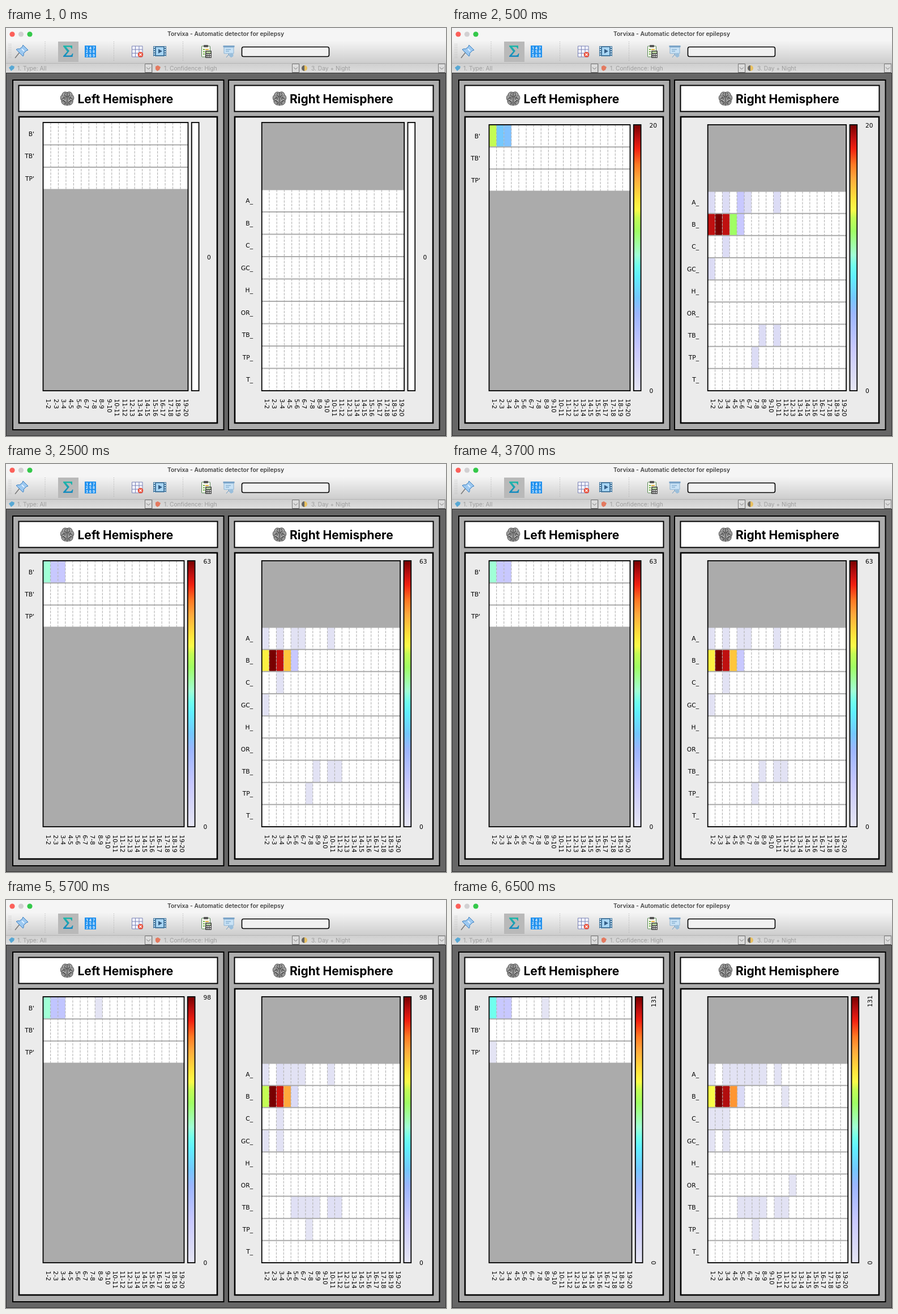
Write an HTML page that moves like this. It is 777x721 px and loops after 8000 ms.

```html
<!DOCTYPE html>
<html lang="en">
<head>
<meta charset="utf-8">
<title>Detector</title>
<style>
  html, body { margin: 0; width: 100%; height: 100%; overflow: hidden; background: #666; }
  svg { display: block; width: 777px; height: 721px; }
  text { font-family: Inter, "Open Sans", sans-serif; }
  #plots text { font: 10.7px "DejaVu Sans", sans-serif; }
  .end { text-anchor: end; }
  .mid { text-anchor: middle; }
  .box { stroke: #000; stroke-width: 2; }
  .head { font-size: 21px; font-weight: 700; }
  .filter { font-size: 10.2px; fill: #9d9d9d; }
  .digits { font-size: 6px; font-weight: 700; fill: #fff; text-anchor: middle; }
</style>
</head>
<body>
<svg viewBox="0 0 777 721">
  <defs>
    <linearGradient id="bar" x2="0" y2="1">
      <stop stop-color="#f5f5f5"/><stop offset="1" stop-color="#cdcdcd"/>
    </linearGradient>
    <linearGradient id="combo" x2="0" y2="1">
      <stop stop-color="#cecece"/><stop offset="1" stop-color="#dedede"/>
    </linearGradient>
    <linearGradient id="teal" x2="0" y2="1">
      <stop stop-color="#20b8a8"/><stop offset="1" stop-color="#1688c0"/>
    </linearGradient>
    <linearGradient id="heat" x1="0" y1="1" x2="0" y2="0"></linearGradient>
    <g id="brain" fill="none" stroke-linecap="round">
      <path d="M0-11C-5-14-9-10-9-7C-13-4-12 1-10 3C-11 8-6 12-2 11L0 12L2 11C7 12 11 8 10 3C13 0 12-5 9-7C9-11 4-14 0-11Z" fill="#9a9a9a" stroke="#555"/>
      <path d="M0-11V11M-3-10q-4 3 0 5t-3 4M-8-6q4 1 2 4t-4 3M-3 0q-5 2-1 5t-1 4M-9 4q4-2 4 2M3-10q4 3 0 5t3 4M8-6q-4 1-2 4t4 3M3 0q5 2 1 5t1 4M9 4q-4-2-4 2" stroke="#444" stroke-width="1.1"/>
      <path d="M-5-9q-3 3-1 5M5-9q3 3 1 5M-7 1q3 0 3 3M7 1q-3 0-3 3" stroke="#d8d8d8" stroke-width=".8"/>
    </g>
  </defs>

  <rect width="777" height="721" fill="#666"/>
  <rect width="777" height="22" fill="#f5f5f5"/>
  <circle cx="11" cy="11" r="4.6" fill="#fc605a"/>
  <circle cx="26.5" cy="11" r="4.6" fill="#d2d0d2"/>
  <circle cx="42" cy="11" r="4.6" fill="#34c84a"/>
  <text class="mid" x="388" y="14" font-size="10.4" font-weight="600" fill="#444">Torvixa - Automatic detector for epilepsy</text>

  <!-- toolbar -->
  <rect y="22" width="777" height="40" fill="url(#bar)"/>
  <path d="M5.500 28V55M8.500 28V55M69 24V60M190.500 24V60M312.500 24V60" stroke="#aaa" stroke-dasharray="1 2"/>
  <g stroke="#3a7fc0" stroke-linejoin="round">
    <path d="M24 43L16 53" stroke="#777" stroke-width="1.500"/>
    <path d="M30 30L39 39L36 40L31 45Q32 48 30 50L18 38Q21 36 24 37L29 33Z" fill="#9cc8f0"/>
    <path d="M28 37L32 41" stroke="#e4f2ff" stroke-width="2"/>
  </g>
  <rect x="92" y="24" width="36" height="36" fill="#b9b9b9"/>
  <path d="M101 31H117V36.500H115.500Q115 33.500 112 33.500H106L112 40.500L105.500 48.500H113Q116 48.500 117 45H118.500L117.500 51H101V49.500L108 41.500L101 32.500Z" fill="url(#teal)"/>
  <rect x="139" y="31" width="20" height="21" fill="#2191ee"/>
  <g class="digits">
    <text x="143" y="37.500">1</text><text x="149" y="37.500">4</text><text x="155" y="37.500">7</text>
    <text x="143" y="44">2</text><text x="149" y="44">5</text><text x="155" y="44">8</text>
    <text x="143" y="50.500">3</text><text x="149" y="50.500">6</text><text x="155" y="50.500">9</text>
  </g>
  <path d="M222.500 32H241V51H222.500ZM222.500 38H241M222.500 44.500H241M228.500 32V51M235 32V51" fill="#f4f5ff" stroke="#7a82b4"/>
  <circle cx="237.500" cy="47" r="4.800" fill="#e8503c"/>
  <path d="M235.500 45l4 4m0-4l-4 4" stroke="#fff" stroke-width="1.300"/>
  <rect x="260" y="32" width="23" height="18" fill="#46789f"/>
  <path d="M262 33V50M281 33V50" stroke="#d8ecfa" stroke-width="2" stroke-dasharray="2 2"/>
  <rect x="265" y="34" width="13" height="14" fill="#a9d6f4"/>
  <path d="M269 37L276 41L269 45Z" fill="#355f88"/>
  <rect x="345.500" y="32" width="15" height="19" rx="1" fill="#f6f6ee" stroke="#5a8a58"/>
  <rect x="349" y="30" width="8" height="4" rx="1" fill="#555"/>
  <path d="M348 38H351M348 42H351M348 46H351" stroke="#70b848" stroke-width="2"/>
  <path d="M352 38H358" stroke="#e0b040" stroke-width="2"/>
  <rect x="352" y="40" width="11" height="13" rx="1" fill="#444"/>
  <rect x="353.500" y="41.500" width="8" height="3" fill="#b8d8a0"/>
  <path d="M354 47H362M354 50.500H362" stroke="#eee" stroke-width="2" stroke-dasharray="2 1"/>
  <path d="M385 34H402V45H385Z" fill="#c9e2f5" stroke="#8bb3d4"/>
  <path d="M383.500 32.500H403.500" stroke="#7ba4c8" stroke-width="3"/>
  <path d="M388 38H397M388 41H394M393.500 45V48M389 52L393 47L398 52" fill="none" stroke="#6c9cc4"/>
  <circle cx="398" cy="48" r="3.500" fill="#9abfdc"/>
  <rect x="416.500" y="33.500" width="154" height="17" rx="3" fill="#f1f1f1" stroke="#000" stroke-width="1.600"/>

  <!-- filter row -->
  <rect y="62" width="777" height="17" fill="url(#combo)"/>
  <path d="M0 62.500H777M258.500 62V79M518 62V79" stroke="#b5b5b5"/>
  <g fill="#dcdcdc" stroke="#777">
    <path d="M245.500 63.500H257.500V78.500H245.500ZM505.500 63.500H517.500V78.500H505.500ZM763.500 63.500H775.500V78.500H763.500Z"/>
    <path d="M248 69.500l3.500 3.500l3.500-3.500M508 69.500l3.500 3.500l3.500-3.500M766 69.500l3.500 3.500l3.500-3.500" fill="none"/>
  </g>
  <path d="M5 70L10 66L15 68L14 72L9 76Z" fill="#58a8d4"/>
  <path d="M264 68L268 66L273 69L271 74L267 76L264 73Z" fill="#e47a60"/>
  <circle cx="527" cy="71" r="5" fill="#e8c060"/>
  <path d="M527 66A5 5 0 0 0 527 76Z" fill="#666"/>
  <g class="filter">
    <text x="20" y="75">1. Type: All</text>
    <text x="279" y="75">1. Confidence: High</text>
    <text x="539" y="75">3. Day + Night</text>
  </g>
  <path d="M0 79.500H777M.5 79V721M776.500 79V721M0 720.500H777" stroke="#333"/>

  <!-- panels -->
  <g id="panels"></g>
  <g id="plots"></g>
</svg>
<script>
const $ = id => document.getElementById(id);

const stops = [
  [0, 230, 230, 244], [5, 220, 220, 245], [16, 200, 200, 255], [29, 156, 182, 255],
  [35, 116, 200, 255], [43, 96, 240, 255], [47, 112, 255, 238], [51, 160, 255, 214],
  [60, 160, 255, 100], [65, 196, 253, 84], [68, 250, 252, 72], [72, 255, 228, 60],
  [80, 255, 168, 60], [85, 255, 122, 36], [91, 242, 32, 16], [95, 192, 16, 16], [100, 120, 0, 0]
];
$('heat').innerHTML = stops.map(([p, ...c]) => `<stop offset="${p}%" stop-color="rgb(${c})"/>`).join('');

function heat(p) {
  const i = Math.max(1, stops.findIndex(s => s[0] >= p));
  const [a, b] = [stops[i - 1], stops[i]];
  const k = (p - a[0]) / (b[0] - a[0]);
  return `rgb(${[1, 2, 3].map(n => Math.round(a[n] + (b[n] - a[n]) * k))})`;
}

// Row values are percentages of the maximum, one per contact pair; '.' is empty.
const states = [
  { at: 0, top: 167, grow: 7, rows: {} },
  { at: 500, top: 171, grow: 0, max: 20, rows: {
    "B'": '65 35 33', A_: '5 . 5 . 16 5 . . . 5', B_: '95 100 95 60 16',
    C_: '. . 5', GC_: '5', TB_: '. . . . . . . 5 . 5', TP_: '. . . . . . 5' } },
  { at: 2500, top: 171, grow: 0, max: 63, rows: {
    "B'": '51 16 16', A_: '2 . 2 . 2 2 . . . 2', B_: '70 100 95 76 16',
    C_: '. . 2', GC_: '2', TB_: '. . . . . . . 2 . 2 2', TP_: '. . . . . . 2' } },
  { at: 4500, top: 171, grow: 0, max: 98, rows: {
    "B'": '51 18 18 . . . . 1', A_: '2 . 4 2 2 2 . . . 2', B_: '65 100 94 80 6',
    C_: '. . 2', GC_: '2 . 2', TB_: '. . . . 3 2 2 2 . 3 3', TP_: '. . . . . . 1' } },
  { at: 6500, top: 171, grow: 3, max: 131, rows: {
    "B'": '47 16 16 . . . . 1', "TP'": '1', A_: '1 . 2 2 2 2 2 2 . 2', B_: '68 100 96 82 6 . . . . . 1',
    C_: '1 1 1', GC_: '1 . 1', OR_: '. . . . . . . . . . . 1',
    TB_: '. . . . 2 2 2 2 . 2 2', TP_: '. . . . . . 1' } }
];

const sides = [
  { name: 'Left', panel: 12, x: 65.5, width: 249, first: 0, labels: "B' TB' TP'" },
  { name: 'Right', panel: 393, x: 451.7, width: 244.5, first: 3, labels: 'A_ B_ C_ GC_ H_ OR_ TB_ TP_ T_' }
];
const COLS = 19, ROWS = 12, BOTTOM = 641;

const rect = (x, y, w, h, fill, more = '') =>
  `<rect x="${x}" y="${y}" width="${w}" height="${h}" fill="${fill}" ${more}/>`;
const text = (x, y, s, more = '') => `<text x="${x}" y="${y}" ${more}>${s}</text>`;
const turned = (x, y, s, angle, more = '') =>
  text(0, 0, s, `transform="translate(${x} ${y}) rotate(${angle})" ${more}`);

$('panels').innerHTML = sides.map(({ name, panel: x }, i) =>
  rect(x, 92, 372.5, 618, '#adadad', 'class="box"') +
  rect(x + 10.5, 101.5, 351, 46, '#fff', 'class="box"') +
  rect(x + 11, 157, 350, 541, '#ebebeb', 'class="box" style="stroke-width:2.6"') +
  `<use href="#brain" x="${i ? 483 : 108}" y="125"/>` +
  text(i ? 501 : 126.5, 132.5, name + ' Hemisphere', 'class="head"')).join('');

function plot(side, state) {
  const { x, first } = side, { top, grow, max } = state;
  const width = side.width + grow, height = BOTTOM - top;
  const cw = width / COLS, rh = height / ROWS;
  const labels = side.labels.split(' ');
  const y0 = top + first * rh, y1 = y0 + labels.length * rh;
  let out = rect(x, top, width, height, '#ababab') + rect(x, y0, width, y1 - y0, '#fff');

  labels.forEach((label, r) => {
    const y = y0 + r * rh;
    (state.rows[label] || '').split(' ').forEach((v, c) => {
      if (v > 0) out += rect(x + c * cw, y, cw, rh, heat(+v));
    });
    out += text(first ? 436 : 50, y + rh / 2 + 4, label, 'class="end"');
  });

  let dashes = '', lines = '';
  for (let c = 1; c < COLS; c++) dashes += `M${x + c * cw} ${y0}V${y1}`;
  for (let r = 0; r <= labels.length; r++) lines += `M${x} ${y0 + r * rh}h${width}`;
  out += `<path d="${dashes}" stroke="#b2b2b2" stroke-width="1.1" stroke-dasharray="4.3 2"/>` +
    `<path d="${lines}" stroke="#ababab" stroke-width="2"/>` +
    rect(x, top, width, height, 'none', 'class="box" style="stroke-width:1.8"');

  for (let c = 0; c < COLS; c++)
    out += turned(x + (c + .5) * cw - 1.2, 655.5, `${c + 1}-${c + 2}`, 90);

  const bx = x + width + 6.3, tx = first ? 730 : 348.5;
  out += rect(bx, top, 12.8, height, max ? 'url(#heat)' : '#fff', 'class="box" style="stroke-width:1.8"');
  if (!max) out += text(tx + 10, 408.500, 0, 'class="mid"');
  else if (max < 100) out += text(tx, top + 4.5, max) + text(tx, BOTTOM + 4, 0);
  else out += turned(tx + 11.5, 179, max, -90, 'class="mid"') + turned(tx + 11.5, BOTTOM, 0, -90, 'class="mid"');
  return out;
}

let shown;
function draw(now) {
  const t = now % 8000;
  const state = states.filter(s => s.at <= t).pop();
  if (state !== shown) {
    shown = state;
    $('plots').innerHTML = sides.map(side => plot(side, state)).join('');
  }
  requestAnimationFrame(draw);
}
draw(0);
</script>
</body>
</html>
```
